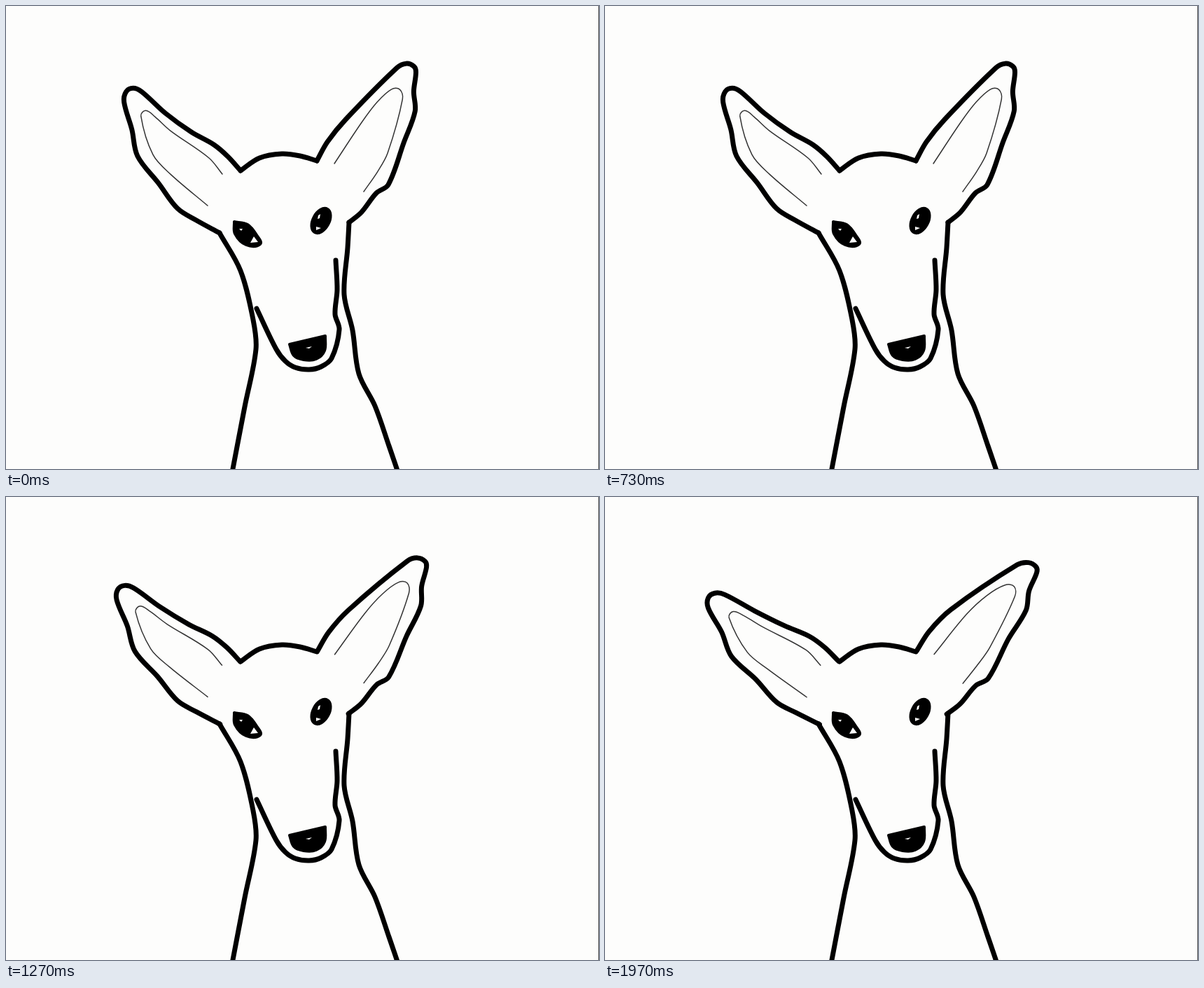
Recreate the animation shown at these times as an HTML page with a canvas. Size 847 by 661 pixels, loop 2000 ms.

```html
<!DOCTYPE html>
<html lang="en">
<head>
<meta charset="utf-8">
<title>Ear wiggle</title>
<style>
html, body { margin: 0; width: 100%; height: 100%; overflow: hidden; background: #fdfdfc; }
canvas { display: block; width: 847px; height: 661px; }
</style>
</head>
<body>
<canvas id="stage" width="847" height="661"></canvas>
<script>
const ctx = document.getElementById('stage').getContext('2d');
const PAPER = '#fdfdfc', INK = '#000';
const LOOP = 2000, CYCLE = 11, PEAK = 8, FALL = 6.5;
const REACH = 208;

const pts = text => text.split(' ').map(p => p.split(',').map(Number));

// up and down are the tip's swing in degrees, stretch its growth when lowered
const ears = [
  {
    pivot: [320, 280], up: 6, down: 8.7, stretch: .015,
    rim: pts('335,235 317,215 297,198 265,180 228,153 194,122 182,117 172,122 169,137 180,176 188,214 218,253 245,289 272,306 305,324'),
    inner: pts('309,240 290,217 235,178 213,158 200,149 193,157 210,212 235,240 288,285')
  },
  {
    pivot: [475, 262], up: -9.5, down: -10.2, stretch: .045,
    rim: pts('444,221 459,194 485,162 558,88 571,82 582,86 585,94 582,122 584,150 568,195 546,255 529,267 508,294 490,309'),
    inner: pts('469,225 508,166 530,137 550,119 562,119 566,133 545,210 531,236 511,265')
  }
];

const body = [
  '335,235 362,217 394,211 420,214 444,221',
  '305,324 335,378 353,448 357,490 341,572 323,666',
  '490,309 488,345 483,412 495,463 504,525 527,571 547,628 560,666',
  '358,432 386,490 399,507 413,516 433,519 450,515 465,503 476,462 470,440 473,405 471,363'
].map(pts);
const nose = pts('405,483 411,499 425,505 443,504 455,492 456,471');
const leftEye = pts('326,308 327,325 343,341 363,340 358,327 345,312 326,308');

// Triangle wave: slow fall, quick rise
function lift(step) {
  const t = (step - PEAK + CYCLE) % CYCLE;
  const drop = t < FALL ? t / FALL : (CYCLE - t) / (CYCLE - FALL);
  return 1 - 2.2 * drop;
}

// Turn each point about the ear's root, more towards the tip
function bend(points, ear, s) {
  const [cx, cy] = ear.pivot;
  return points.map(([x, y]) => {
    const r = Math.hypot(x - cx, y - cy), w = r / REACH;
    const swing = s * w * (s > 0 ? ear.up : ear.down) * Math.PI / 180;
    const a = Math.atan2(y - cy, x - cx) + swing;
    const len = r * (1 + ear.stretch * w * Math.max(0, -s));
    return [cx + len * Math.cos(a), cy + len * Math.sin(a)];
  });
}

// Smooth curve through all points, handles scaled to each segment
function trace(p) {
  const at = i => p[Math.max(0, Math.min(p.length - 1, i))];
  const handle = (i, size) => {
    const [x0, y0] = at(i - 1), [x1, y1] = at(i + 1);
    const k = size / Math.hypot(x1 - x0, y1 - y0);
    return [(x1 - x0) * k, (y1 - y0) * k];
  };
  ctx.beginPath();
  ctx.moveTo(...p[0]);
  for (let i = 0; i < p.length - 1; i++) {
    const [bx, by] = p[i], [cx, cy] = p[i + 1];
    const size = Math.hypot(cx - bx, cy - by) / 3;
    const [ux, uy] = handle(i, size), [vx, vy] = handle(i + 1, size);
    ctx.bezierCurveTo(bx + ux, by + uy, cx - vx, cy - vy, cx, cy);
  }
}

function line(p, width, color = INK) {
  trace(p);
  ctx.lineWidth = width;
  ctx.strokeStyle = color;
  ctx.stroke();
}

function fillInk() {
  ctx.closePath();
  ctx.fillStyle = ctx.strokeStyle = INK;
  ctx.lineWidth = 4;
  ctx.fill();
  ctx.stroke();
}

function blob(p) {
  trace(p);
  fillInk();
}

function glint(text) {
  ctx.beginPath();
  pts(text).forEach(q => ctx.lineTo(...q));
  ctx.fillStyle = PAPER;
  ctx.fill();
}

function draw(ms) {
  const step = Math.floor((Math.floor(ms / 10) * 10 + 3.4) * .03) % CYCLE;
  const s = lift(step);

  ctx.fillStyle = PAPER;
  ctx.fillRect(0, 0, 847, 661);
  ctx.fillStyle = '#555';
  ctx.fillRect(846, 0, 1, 661);
  ctx.lineCap = ctx.lineJoin = 'round';

  for (const ear of ears) {
    line(bend(ear.inner, ear, s), 1.5, '#333');
    line(bend(ear.rim, ear, s), 7);
  }
  for (const p of body) line(p, 7);

  blob(leftEye);
  glint('354,329 360,337 349,338');
  glint('333,318 338,318 336,321');
  ctx.beginPath();
  ctx.ellipse(450, 306.5, 19, 11.5, -1.08, 0, 7);
  fillInk();
  glint('446,299 449,297 448,303 445,304');
  glint('443,315 450,317 443,320');
  blob(nose);
  glint('428,488 437,486 433,489');
}

function tick() {
  draw(performance.now() % LOOP);
  requestAnimationFrame(tick);
}
tick();
</script>
</body>
</html>
```
